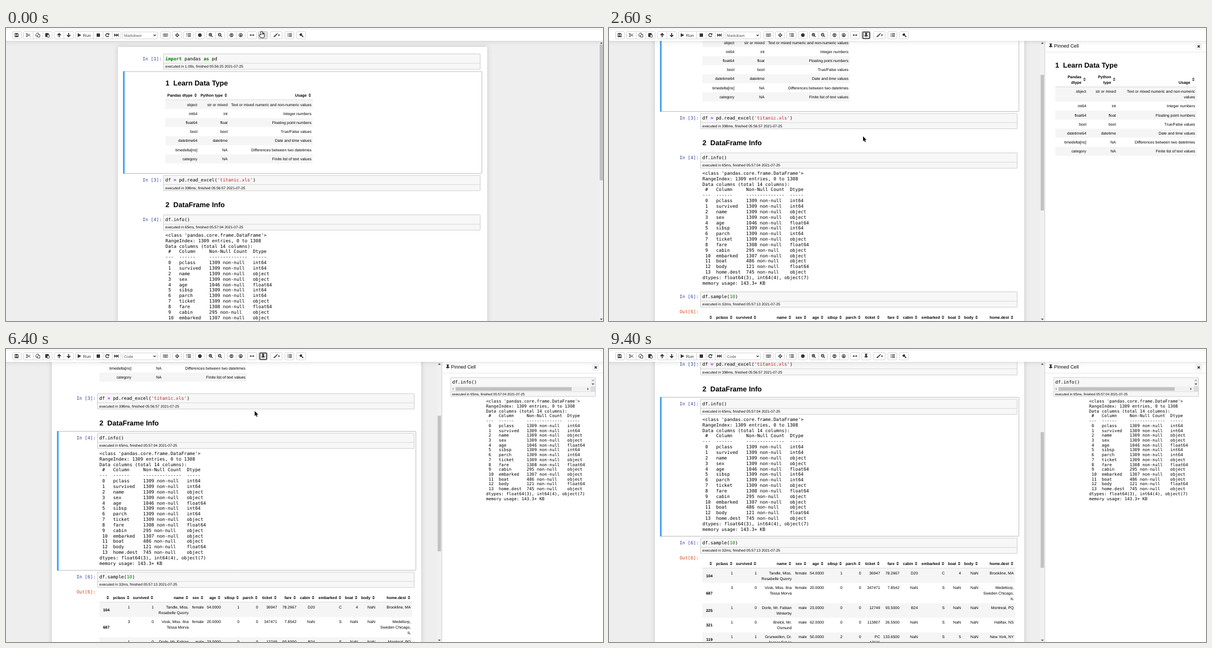
An HTML page with a canvas that plays this animation: 1067 by 525 pixels, repeating every 9.5 s.

```html
<!DOCTYPE html>
<html lang="en">
<head>
<meta charset="utf-8">
<title>Pinned notebook cell</title>
<style>
  html, body { margin: 0; width: 100%; height: 100%; overflow: hidden; background: #eee; }
  canvas { display: block; }
</style>
</head>
<body>
<canvas id="stage" width="1067" height="525"></canvas>
<script>
const ctx = document.getElementById('stage').getContext('2d');
const LOOP = 9500;
const SANS = '"Liberation Sans", Arial, sans-serif';
const MONO = '"DejaVu Sans Mono", monospace';
const CODE = 8.115, CELL = 6.95, HEADING = 12.65;

// ---- Timeline: [ms, value...] with linear motion between entries ----
const cursorPath = [
  [0, 457, 6], [300, 457, 6], [500, 458, 7], [1100, 458, 7], [1200, 465, 91],
  [1700, 454, 194], [3400, 454, 194], [3500, 324, 261], [3700, 324, 261],
  [4300, 399, 36], [4600, 450, 12], [4700, 457, 7], [5000, 458, 6], [5300, 458, 7],
  [5900, 445, 111], [6400, 444.5, 111], [6900, 442.5, 114], [7200, 441, 117],
  [7650, 180, 317], [8000, 12, 281], [8300, 12, 281], [9100, 72, 7], [9200, 72, -30]
];
const scrollPath = [
  [1700, 0], [2100, 61], [2600, 111], [3200, 111], [3300, 123],
  [5900, 123], [6300, 184], [6500, 184], [6900, 245]
];

function at(path, t) {
  const next = path.findIndex(key => key[0] > t);
  if (next === 0) return path[0].slice(1);
  if (next < 0) return path[path.length - 1].slice(1);
  const a = path[next - 1], b = path[next];
  const k = (t - a[0]) / (b[0] - a[0]);
  return a.slice(1).map((v, i) => v + (b[i + 1] - v) * k);
}

// ---- Content ----
const learnHead = ['Pandas dtype', 'Python type', 'Usage'];
const learnRows = [
  ['object', 'str or mixed', 'Text or mixed numeric and non-numeric values'],
  ['int64', 'int', 'Integer numbers'],
  ['float64', 'float', 'Floating point numbers'],
  ['bool', 'bool', 'True/False values'],
  ['datetime64', 'datetime', 'Date and time values'],
  ['timedelta[ns]', 'NA', 'Differences between two datetimes'],
  ['category', 'NA', 'Finite list of text values']
];
const pinnedHead = ['Pandas\ndtype', 'Python\ntype', 'Usage'];
const pinnedRows = learnRows.map(row => row.map(s => s.replace(' values', s.length > 40 ? '\nvalues' : ' values')));

const infoColumns = `pclass 1309 int64,survived 1309 int64,name 1309 object,sex 1309 object,
age 1046 float64,sibsp 1309 int64,parch 1309 int64,ticket 1309 object,fare 1308 float64,
cabin 295 object,embarked 1307 object,boat 486 object,body 121 float64,home.dest 745 object`;
const infoLines = [
  "<class 'pandas.core.frame.DataFrame'>",
  'RangeIndex: 1309 entries, 0 to 1308',
  'Data columns (total 14 columns):',
  ' #   Column     Non-Null Count  Dtype',
  '---  ------     --------------  -----',
  ...infoColumns.split(',').map((column, i) => {
    const [name, count, type] = column.trim().split(' ');
    return ` ${String(i).padEnd(2)}  ${name.padEnd(11)}${(count + ' non-null').padEnd(16)}${type}`;
  }),
  'dtypes: float64(3), int64(4), object(7)',
  'memory usage: 143.3+ KB'
];

const sampleHead = ['', ...'pclass survived name sex age sibsp parch ticket fare cabin embarked boat body home.dest'.split(' ')];
const sampleRights = [185, 221.5, 264, 326.5, 353.5, 384, 417, 450.5, 484.5, 519, 552, 600, 629, 660, 723.5];
const sampleRows = [
  '104|1|1|Tandle, Miss.\nRosabelle Quorry|female|54.0000|1|0|36947|78.2667|D20|C|4|NaN|Brookline, MA',
  '687|3|0|Vosk, Miss. Ilna\nTessa Morva|female|20.0000|0|0|347471|7.8542|NaN|S|NaN|NaN|Medeltorp,\nSweden Chicago,\nIL',
  '225|1|0|Dorle, Mr. Fabian\nWinterby|male|23.0000|0|0|12749|93.5000|B24|S|NaN|NaN|Montreal, PQ',
  '321|1|0|Brelck, Mr.\nOsmund|male|62.0000|0|0|113807|26.5500|NaN|S|NaN|NaN|Halifax, NS',
  '119|1|1|Grunwellen, Dr.\nJasper Colvin|male|50.0000|2|0|PC\n17611|133.6500|NaN|S|5|NaN|New York, NY'
].map(row => row.split('|'));

// ---- Drawing helpers; text y is the middle of the capitals ----
function text(str, x, y, size, { family = SANS, color = '#000', align = 'left', bold = false } = {}) {
  ctx.font = `${bold ? 'bold ' : ''}${size}px ${family}`;
  ctx.fillStyle = color;
  ctx.textAlign = align;
  ctx.fillText(str, x, y + size * 0.36);
}

function box(x0, y0, x1, y1, fill, stroke, radius = 0, width = 1) {
  ctx.beginPath();
  ctx.roundRect(x0, y0, x1 - x0, y1 - y0, radius);
  if (fill) { ctx.fillStyle = fill; ctx.fill(); }
  if (stroke) { ctx.strokeStyle = stroke; ctx.lineWidth = width; ctx.stroke(); }
}

function shape(x, y, { fill, stroke, color = '#333', width = 1 }) {
  ctx.save();
  ctx.translate(x, y);
  if (fill) { ctx.fillStyle = color; ctx.fill(new Path2D(fill)); }
  if (stroke) { ctx.strokeStyle = color; ctx.lineWidth = width; ctx.stroke(new Path2D(stroke)); }
  ctx.restore();
}

function shadowed(draw) {
  ctx.save();
  ctx.shadowColor = 'rgba(87,87,87,.25)';
  ctx.shadowBlur = 8;
  draw();
  ctx.restore();
}

const UP = 'M-2.5 1.2L0-1.5 2.5 1.2Z', DOWN = 'M-2.5-1.2L0 1.5 2.5-1.2Z';
const LEFT = 'M1-2.2V2.2L-1.4 0Z', RIGHT = 'M-1-2.2V2.2L1.4 0Z';
const SORT = 'M-2.5-.7L0-3.1 2.5-.7ZM-2.5 .7L0 3.1 2.5 .7Z';
const PIN = 'M-2.2-4.2H2.2V-3.3L1.4-2.8V-.3L3 1V2H.5L0 4.5-.5 2H-3V1L-1.4-.3V-2.8L-2.2-3.3Z';
const ARROW = 'M0 0V9L2 7.2 3.4 10.4 4.9 9.7 3.5 6.7 6.2 6.5Z';
const HAND = 'M-1 .8Q0-.6 1 .8V4L4.6 5V8L3.6 11H-1.6L-4.2 7.2Q-4 5.6-2.6 6.2L-1 7.2Z';

function table(left, right, top, head, rights, rows, { indexed = false, pointer } = {}) {
  const tall = Math.max(...head.map(s => s.split('\n').length));
  head.forEach((label, c) => {
    const lines = label.split('\n');
    lines.forEach((line, i) => text(line, rights[c] - 8.6, top - 8.6 - 10 * (lines.length - 1 - i), CELL, { bold: true, align: 'right' }));
    shape(rights[c] - 3.2, top - 8.6 - 5 * (tall - 1), { fill: SORT });
  });
  let y = top;
  rows.forEach((row, r) => {
    const height = 6.2 + 10 * Math.max(...row.map(s => s.split('\n').length));
    const hover = pointer && pointer.x > left && pointer.x < right && pointer.y > y && pointer.y < y + height;
    if (hover || r % 2 === 0) box(left, y, right, y + height, hover ? '#d9edfd' : '#f5f5f5');
    row.forEach((cell, c) => {
      if (indexed && c === 0) text(cell, rights[c], y + height / 2, CELL, { bold: true, align: 'right' });
      else cell.split('\n').forEach((line, i) => text(line, rights[c], y + 8.1 + 10 * i, CELL, { align: 'right' }));
    });
    y += height;
  });
  box(left, top - 0.5, right, top, '#bbb');
}

function heading(str, x, y) {
  text(str, x, y, HEADING, { bold: true });
}

function prompt(label, y, color = '#303f9f') {
  text(label, 126.2, y, CODE, { family: MONO, color });
}

function codeCell(number, y, tokens, executed) {
  prompt(`In [${number}]:`, y);
  box(163.5, y - 8.5, 729.5, y + 19, '#f7f7f7', '#cfcfcf', 1);
  box(164, y + 7.8, 729, y + 8.5, '#cfcfcf');
  let x = 166.8;
  for (const [str, color, bold] of tokens) {
    text(str, x, y, CODE, { family: MONO, color, bold });
    x += str.length * CODE * 0.602;
  }
  text(`executed in ${executed} 2021-07-25`, 166.8, y + 13.8, 6.5);
}

function output(x, y, size, spacing) {
  infoLines.forEach((line, i) => text(line, x, y + i * spacing, size, { family: MONO }));
}

// ---- Notebook ----
function notebook(scroll, dx, infoSelected, cursor) {
  ctx.save();
  ctx.translate(dx, -scroll);
  shadowed(() => box(82, 34, 742, 900, '#fff'));
  const [top, bottom] = infoSelected ? [331.5, 580.5] : [78, 260.5];
  box(91.5, top, 732.6, bottom, '#fff', '#ababab', 1, 0.8);
  box(91.2, top - 0.4, 94.1, bottom + 0.4, '#42a5f5');

  codeCell(1, 55, [['import', '#008000', true], [' pandas '], ['as', '#008000', true], [' pd']], '1.09s, finished 05:56:25');
  heading('1  Learn Data Type', 167, 98.8);
  table(167, 430.5, 129, learnHead, [224, 278, 428], learnRows,
    { pointer: { x: cursor.x - dx, y: cursor.y + scroll } });
  codeCell(3, 272.5, [['df '], ['=', '#aa22ff', true], [' pd.read_excel('], ["'titanic.xls'", '#ba2121'], [')']], '398ms, finished 05:56:57');
  heading('2  DataFrame Info', 167, 316.4);
  codeCell(4, 343.3, [['df.info()']], '65ms, finished 05:57:04');
  output(167, 371, CODE, 9.845);
  codeCell(6, 592.2, [['df.sample('], ['10', '#008800'], [')']], '32ms, finished 05:57:13');
  prompt('Out[6]:', 619.5, '#d84315');
  table(167, 726, 638, sampleHead, sampleRights, sampleRows, { indexed: true });
  ctx.restore();
}

function scrollbar(x, scroll) {
  box(x, 23, x + 7, 525, '#f1f1f1');
  const y = 30 + scroll * 0.486;
  box(x + 0.5, y, x + 6.5, y + 243, '#c1c1c1');
  shape(x + 3.5, 27, { fill: UP, color: '#505050' });
  shape(x + 3.5, 522, { fill: DOWN, color: '#505050' });
}

// ---- Side panel ----
function panel(showInfo) {
  box(778, 23, 1067, 525, '#fff');
  box(778.5, 23, 779.3, 525, '#bbb');
  box(779, 42.7, 1067, 43.5, '#ddd');
  shape(789.5, 32, { fill: PIN });
  text('Pinned Cell', 795.5, 31.7, 8.6);
  box(1049, 28, 1059, 38, '#fff', '#e0e0e0', 1);
  shape(1054, 33, { stroke: 'M-2-2L2 2M2-2L-2 2', width: 1.7 });
  if (!showInfo) {
    heading('1  Learn Data Type', 797.5, 66.8);
    table(797.5, 1050.5, 105.6, pinnedHead, [853, 906, 1047.5], pinnedRows);
    return;
  }
  box(795, 51, 1053.5, 85, '#f7f7f7', '#cfcfcf', 1);
  text('df.info()', 797.5, 59, CODE, { family: MONO });
  box(1045, 51.5, 1053, 67, '#f1f1f1');
  shape(1049, 56, { fill: UP, color: '#a3a3a3' });
  shape(1049, 63, { fill: DOWN, color: '#505050' });
  box(795.5, 67, 1045, 76, '#f1f1f1');
  box(1045, 67, 1053, 76, '#dcdcdc');
  box(803.5, 68.5, 1011, 74.8, '#c1c1c1');
  shape(799, 71.5, { fill: LEFT, color: '#a3a3a3' });
  shape(1040, 71.5, { fill: RIGHT, color: '#505050' });
  box(795.5, 76, 1053, 76.6, '#cfcfcf');
  text('executed in 65ms, finished 05:57:04 2021-07-25', 797.5, 80.6, 6.05);
  output(858, 93.6, 7.54, 8.71);
}

// ---- Toolbar ----
const circle = (r, x = 0, y = 0) => `M${x - r} ${y}a${r} ${r} 0 1 0 ${2 * r} 0a${r} ${r} 0 1 0 ${-2 * r} 0`;
const lens = circle(2.3, -0.7, -0.7) + 'M1 1L3.4 3.4M-2-.7H.6';
const bars = 'M-1.5-2.5H4M-1.5 0H4M-1.5 2.5H4';
const buttonGroups = [
  [11, 28], [31, 48.5, 66, 83], [86, 103.5, 121], [124, 156.5, 173.5, 190, 206], [276, 294],
  [297, 314], [317, 335], [338, 355], [358, 374.5, 391], [395, 411.5, 428], [431, 448],
  [451, 467.5], [472, 494], [498, 515], [519, 536]
];
const icons = [
  [19, { stroke: 'M-3-3H2L3-2V3H-3Z', fill: 'M-1.6-3V-.8H1.4V-3ZM-2 .9H2V3H-2Z' }],
  [39.5, { stroke: circle(1.1, -2.3, -2) + circle(1.1, -2.3, 2) + 'M-1.3-1.4L4 2.2M-1.3 1.4L4-2.2', width: 0.9 }],
  [57, { stroke: 'M-3.5-1.5L-2-3.5H1V-1M-3.5-1.5V2H-.5M-.5 0L1-1.2H3.5V3.7H-.5Z', width: 0.9 }],
  [74, { stroke: 'M-3.2-3H2V-1M-3.2-3V3H-.5M-.2-.6H3.4V3.7H-.2Z', fill: 'M-3.5-3.3H2V-.8H-.6V3H-3.5Z', width: 0.9 }],
  [95, { stroke: 'M0 3.7V-2.7M-3 .2L0-2.8 3 .2', width: 1.7 }],
  [112, { stroke: 'M0-3.7V2.7M-3-.2L0 2.8 3-.2', width: 1.7 }],
  [131, { fill: 'M-2.8-3.5L3.5 0-2.8 3.5Z' }],
  [165, { fill: 'M-3-3H3V3H-3Z' }],
  [181, { stroke: 'M2.2-1.7A2.8 2.8 0 1 0 2.7 1', fill: 'M3.6-3.7V-.4H.3Z', width: 1.3 }],
  [197.5, { fill: 'M-4-3L-.4 0-4 3ZM-.4-3L3 0-.4 3ZM3-3H4V3H3Z' }],
  [285, { stroke: 'M-4-2.5H4V2.5H-4ZM-3-1H3M-3 .3H3M-2 1.5H2', width: 0.7 }],
  [306, { stroke: circle(2) + 'M0-4V-1M0 1V4M-4 0H-1M1 0H4', width: 1.1 }],
  [326.5, { stroke: bars + 'M-3.2-3.5V-1.5M-3.8 0H-2.7M-3.8 2.5H-2.7', width: 1.2 }],
  [346.5, { fill: circle(3.2) }],
  [366, { stroke: lens + 'M-.7-2V.6', width: 1.2 }],
  [382.5, { stroke: lens, width: 1.2 }],
  [403, { stroke: circle(2.9) + 'M0 2V-1.4M-1.4 0L0-1.4 1.4 0', width: 1.1 }],
  [419.5, { stroke: circle(2.9) + 'M0-2V1.4M-1.4 0L0 1.4 1.4 0', width: 1.1 }],
  [439.7, { stroke: 'M-3 0H3', fill: 'M-4.2 0L-2-2V2ZM4.2 0L2-2V2Z', width: 1.1 }],
  [481.5, { fill: 'M4-4L4.2-3 1 1.2-.6 0ZM-1 .3L.7 1.6Q-.5 4-4 3.2Q-2.6 2.5-2.3 1.3Z' }],
  [488, { fill: RIGHT }],
  [507, { stroke: bars + 'M-3.8-2.5H-2.5M-3.8 0H-2.5M-3.8 2.5H-2.5', width: 1.3 }],
  [527.5, { fill: 'M-3.5-.8L-.2-3.8 2.2-1.2-1 1.7Z', stroke: 'M.2-.2L3.7 3.4', width: 1.7 }]
];

function toolbar(mode, hover, focused) {
  shadowed(() => box(-10, -10, 1077, 23, '#fff'));
  box(0, 1.6, 1067, 2.4, '#e7e7e7');
  for (const group of buttonGroups) {
    box(group[0] + 0.5, 6.5, group[group.length - 1] - 0.5, 19.5, '#fff', '#ccc', 1.2, 0.8);
    for (const x of group.slice(1, -1)) box(x - 0.4, 6.5, x + 0.4, 19.5, '#ccc');
  }
  for (const [x, icon] of icons) shape(x, 12.7, icon);
  text('Run', 137.5, 12.8, 7.54, { color: '#333' });
  box(208.5, 7, 270.5, 19.5, '#fff', '#ccc', 1, 0.8);
  text(mode, 211, 13.3, 6.85, { color: '#555' });
  shape(265.7, 13, { stroke: 'M-2-1L0 1 2-1', width: 1.2 });

  if (hover || focused) box(451.5, 6.5, 467, 19.5, '#e6e6e6', '#adadad', 1.2, 0.8);
  if (focused) box(453.7, 7.2, 465.7, 18.8, '#e6e6e6', '#222', 1.5, 1.3);
  shape(459.5, 12.7, { fill: PIN });
}

function pointer(cursor, hand) {
  const outline = hand ? HAND : ARROW;
  shape(cursor.x, cursor.y, { stroke: outline, color: hand ? '#000' : '#fff', width: 1.6 });
  shape(cursor.x, cursor.y, { fill: outline, color: hand ? '#fff' : '#111' });
  if (hand) shape(cursor.x, cursor.y, { stroke: 'M1 4V6.3M2.8 4.6V6.5', color: '#000', width: 0.7 });
}

function draw(t) {
  const [x, y] = at(cursorPath, t);
  const cursor = { x, y };
  const scroll = Math.round(at(scrollPath, t)[0]);
  const pinned = t >= 700, infoSelected = t >= 3700;
  const hand = y < 20 && Math.abs(x - 458) < 7;
  const focused = (t >= 300 && t < 3500) || (t >= 5000 && t < 9400);

  // An invisible skew keeps text baselines from snapping to whole pixels.
  ctx.setTransform(1, 1e-5, 0, 1, 0, 0);
  ctx.textRendering = 'geometricPrecision';
  box(-1, -1, 1068, 526, '#eee');
  notebook(scroll, pinned ? 0 : 118, infoSelected, cursor);
  scrollbar(pinned ? 771 : 1060.5, scroll);
  if (pinned) panel(t >= 5300);
  toolbar(infoSelected ? 'Code' : 'Markdown', hand, focused);
  if (y > -15) pointer(cursor, hand);
}

const start = performance.now();
function tick() {
  const t = (performance.now() - start) % LOOP;
  draw(Math.floor(t / 100) * 100);
  requestAnimationFrame(tick);
}
tick();
</script>
</body>
</html>
```
